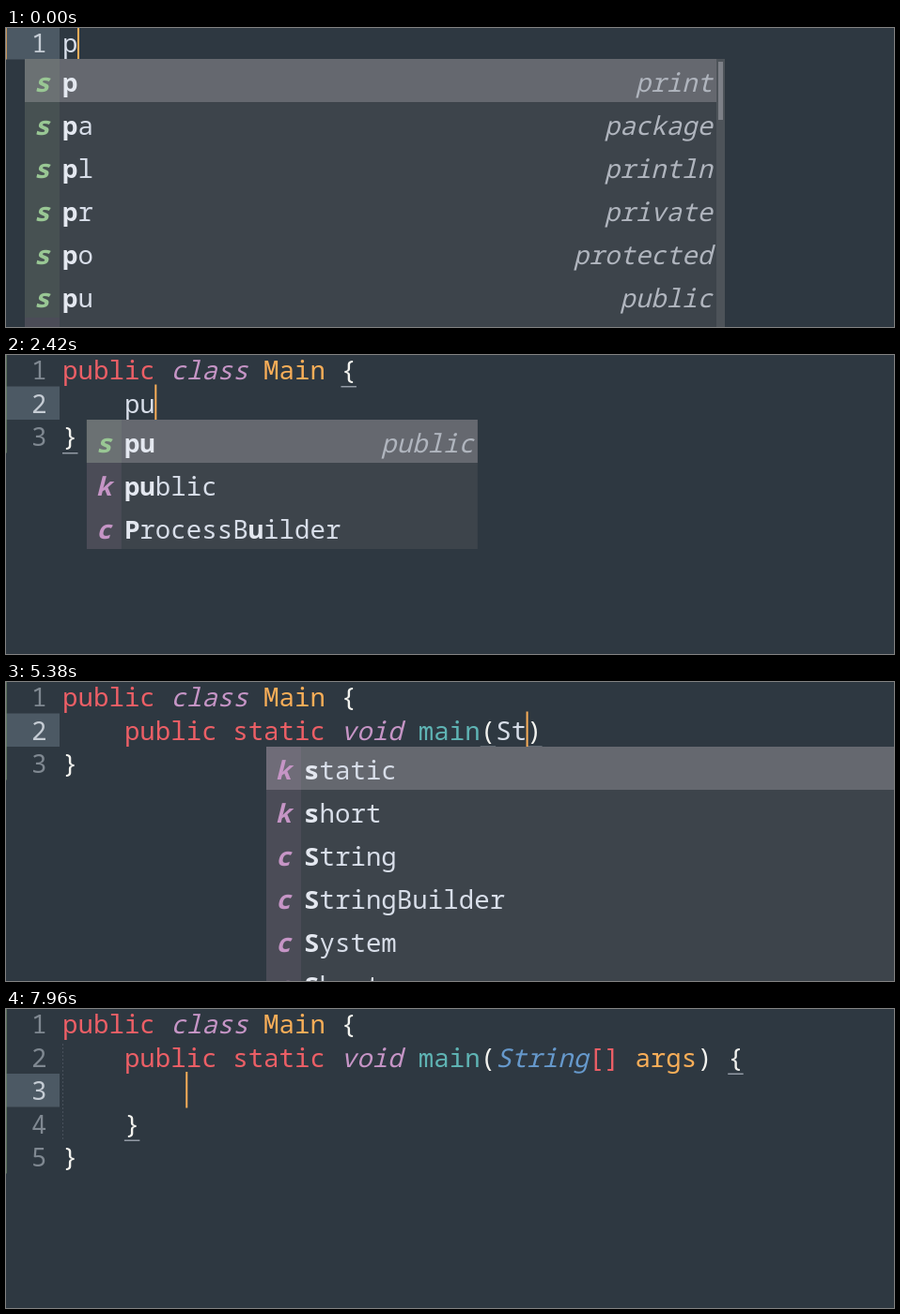
These frames come from a looping animation (945x319 px, 8000 ms). An HTML page with a canvas:

```html
<!DOCTYPE html>
<html lang="en">
<head>
<meta charset="utf-8">
<title>Typing a Java class</title>
<style>
  html, body { margin: 0; width: 100%; height: 100%; overflow: hidden; background: #2e3841; }
  canvas { display: block; }
</style>
</head>
<body>
<canvas id="stage" width="945" height="319"></canvas>
<script>
const ctx = document.getElementById('stage').getContext('2d');

const LOOP = 8000;
const CHAR = 16.47, LINE = 35.5, ROW = 46, LEFT = 60, WINDOW_RIGHT = 1022;
const POPUP_DELAY = 60;
const FONT = '27.45px "Noto Sans Mono", "DejaVu Sans Mono", monospace';
const COLOR = {
  text: '#d8dee9', punct: '#f2f2ee', red: '#ec5f66', purple: '#c695c6',
  orange: '#f9ae58', teal: '#5fb4b4', blue: '#6699cc', green: '#99c794'
};

const KEYS = 'public class Main {\npublic static void main(String[] args) {\n';

// [keys typed, time in ms]; evenly paced in between
const PACE = [[1, -100], [14, 1230], [22, 2330], [33, 3640], [40, 4640],
              [51, 5950], [58, 7000], [60, 7450], [61, 7700]];

// Completions by first letter: kind, name, optional hint
const MENUS = {
  p: ['s p print', 's pa package', 's pl println', 's pr private', 's po protected', 's pu public',
      'k package', 'k private', 'k protected', 'k public', 'c Package', 'c Process', 'c ProcessBuilder'],
  c: ['k class', 'k char', 'c Class', 'c ClassLoader', 'c Character', 'c Cloneable', 'x ClassCastException'],
  m: ['c Math', 's m method', 's main method (main)', 'c StrictMath', 'e OutOfMemoryError',
      'c SecurityManager', 'e VirtualMachineError', 'x NumberFormatException'],
  s: ['k static', 'k short', 'c String', 'c StringBuilder', 'c System', 'c Short',
      'x IllegalStateException', 'x InstantiationException'],
  v: ['k void', 'c Void', 'e VerifyError', 'e VirtualMachineError'],
  a: ['k abstract', 'c Appendable', 'x ArithmeticException', 'x IllegalArgumentException',
      'x ArrayStoreException', 'e AssertionError', 'x ArrayIndexOutOfBoundsException']
};

const SYNTAX = [
  [/\b(public|static)\b|[[\]]/g, COLOR.red],
  [/\b(class|void)\b/g, COLOR.purple, 'italic'],
  [/(?<=class )\w+|(?<=\[\] )\w+/g, COLOR.orange],
  [/\bmain(?=\()/g, COLOR.teal],
  [/\bString\b/g, COLOR.blue, 'italic'],
  [/[(){}]/g, COLOR.punct]
];
const CLOSER = { '{': '}', '(': ')', '[': ']' };

function rect(x, y, w, h, color, alpha = 1) {
  ctx.globalAlpha = alpha;
  ctx.fillStyle = color;
  ctx.fillRect(x, y, w, h);
  ctx.globalAlpha = 1;
}

function glyph(ch, x, y, color, style = '') {
  ctx.font = `${style} ${FONT}`;
  ctx.fillStyle = color;
  ctx.fillText(ch, x, y);
}

function write(text, x, y, color, style) {
  [...text].forEach((ch, i) => glyph(ch, x + i * CHAR, y, color, style));
}

function keysTyped(t) {
  const next = PACE.findIndex(([, time]) => time > t);
  if (next < 0) return KEYS.length;
  if (next === 0) return 1;
  const [n0, t0] = PACE[next - 1], [n1, t1] = PACE[next];
  return Math.floor(n0 + (n1 - n0) * (t - t0) / (t1 - t0));
}

// Text on both sides of the caret, with brackets closed automatically
function editorState(count) {
  let before = '', after = '';
  for (const key of KEYS.slice(0, count)) {
    if (key === '\n') {
      const depth = after.split('}').length - 1;
      before += '\n' + '    '.repeat(depth);
      after = '\n' + '    '.repeat(depth - 1) + after;
    } else {
      before += key;
      if (CLOSER[key]) after = CLOSER[key] + after;
      else if (after[0] === key) after = after.slice(1);
    }
  }
  return { before, after };
}

function position(text) {
  const lines = text.split('\n');
  return { row: lines.length - 1, col: lines.at(-1).length };
}

function enclosingPair({ before, after }) {
  const close = after.search(/[\])}]/);
  if (close < 0) return [];
  let depth = 0, open = before.length - 1;
  for (; open >= 0; open--) {
    if (/[\])}]/.test(before[open])) depth++;
    else if (CLOSER[before[open]] && depth-- === 0) break;
  }
  return [open, before.length + close];
}

function drawCode(state) {
  const text = state.before + state.after;
  const lines = text.split('\n');
  const caret = position(state.before);

  rect(0, caret.row * LINE - 2, 57, LINE, '#4c5964');
  rect(0, 0, 1, lines.length * LINE - 2, lines.length > 1 ? '#6f8a68' : COLOR.orange, 0.7);
  if (lines.length > 3) {
    for (let y = 37; y < 140; y += 4) rect(60, y, 1, 2, COLOR.text, 0.15);
  }

  lines.forEach((line, row) => {
    const y = 26 + row * LINE;
    glyph(String(row + 1), 27, y, row === caret.row ? '#c5ccd4' : '#7f8891');
    const looks = Array(line.length).fill([COLOR.text]);
    for (const [pattern, ...look] of SYNTAX) {
      for (const match of line.matchAll(pattern)) {
        looks.fill(look, match.index, match.index + match[0].length);
      }
    }
    [...line].forEach((ch, i) => glyph(ch, LEFT + i * CHAR, y, ...looks[i]));
  });

  for (const index of enclosingPair(state)) {
    const { row, col } = position(text.slice(0, index));
    const color = /[[\]]/.test(text[index]) ? COLOR.red : COLOR.text;
    rect(LEFT + col * CHAR, 33 + row * LINE, CHAR, 1.5, color, 0.6);
  }
  rect(LEFT + caret.col * CHAR - 0.5, caret.row * LINE - 4, 2, LINE + 3, COLOR.orange);
}

// Indexes of the letters that match, or null; letters may be out of order
function fuzzy(word, name) {
  const hits = new Set(), lower = name.toLowerCase();
  let last = -1;
  for (const ch of word.toLowerCase()) {
    let at = lower.indexOf(ch, last + 1);
    if (at < 0) at = [...lower].findIndex((c, i) => c === ch && !hits.has(i));
    else last = at;
    if (at < 0) return null;
    hits.add(at);
  }
  return hits;
}

function completions(word) {
  return (MENUS[word[0].toLowerCase()] || []).map(entry => {
    const [kind, name, ...hint] = entry.split(' ');
    return { kind, name, hint: hint.join(' '), hits: fuzzy(word, name) };
  }).filter(({ kind, name, hits }) =>
    hits && (kind === 's' || name.toLowerCase() !== word.toLowerCase()));
}

function drawPopup(word, wordX, top) {
  const items = completions(word);
  if (!items.length) return;
  const scrolls = items.length > 6;
  const longest = Math.max(...items.map(item => item.name.length));
  let width = 40 + longest * CHAR + 14;
  if (items.some(item => item.hint)) width = Math.max(width, 416);
  if (scrolls) width = /m/i.test(word[0]) ? 802 : 745;
  const x = Math.min(wordX - 40, WINDOW_RIGHT - width);
  const right = x + width - (scrolls ? 9 : 0);

  rect(x, top, width, items.length * ROW, '#3d444b');
  rect(x, top, right - x, ROW, '#65686f');
  items.forEach(({ kind, name, hint, hits }, i) => {
    const y = top + i * ROW, base = y + 35;
    const color = kind === 's' ? COLOR.green : COLOR.purple;
    rect(x, y, 37, ROW, color, 0.1);
    glyph(kind, x + 10, base, color, 'italic bold');
    [...name].forEach((ch, k) =>
      glyph(ch, x + 40 + k * CHAR, base, hits.has(k) ? '#e4e8f0' : COLOR.text, hits.has(k) ? 'bold' : ''));
    write(hint, right - 4 - hint.length * CHAR, base, '#b0b5be', 'italic');
  });
  if (scrolls) {
    rect(right, top, 9, items.length * ROW, '#4d5359');
    rect(right + 2, top + 3, 5, 62, '#7d8087');
  }
}

function draw(t) {
  rect(0, 0, 945, 319, '#2e3841');
  const state = editorState(keysTyped(t));
  drawCode(state);

  // The list trails the keyboard slightly but never outlives its word
  const shown = editorState(keysTyped(t - POPUP_DELAY)).before;
  const word = shown.match(/\w+$/)?.[0];
  if (word && /^\w*$/.test(state.before.slice(shown.length))) {
    const { row, col } = position(shown);
    drawPopup(word, LEFT + (col - word.length) * CHAR, Math.floor((row + 1) * LINE - 2));
  }
}

const start = performance.now();
function tick() {
  draw((performance.now() - start) % LOOP);
  requestAnimationFrame(tick);
}
tick();
</script>
</body>
</html>
```
